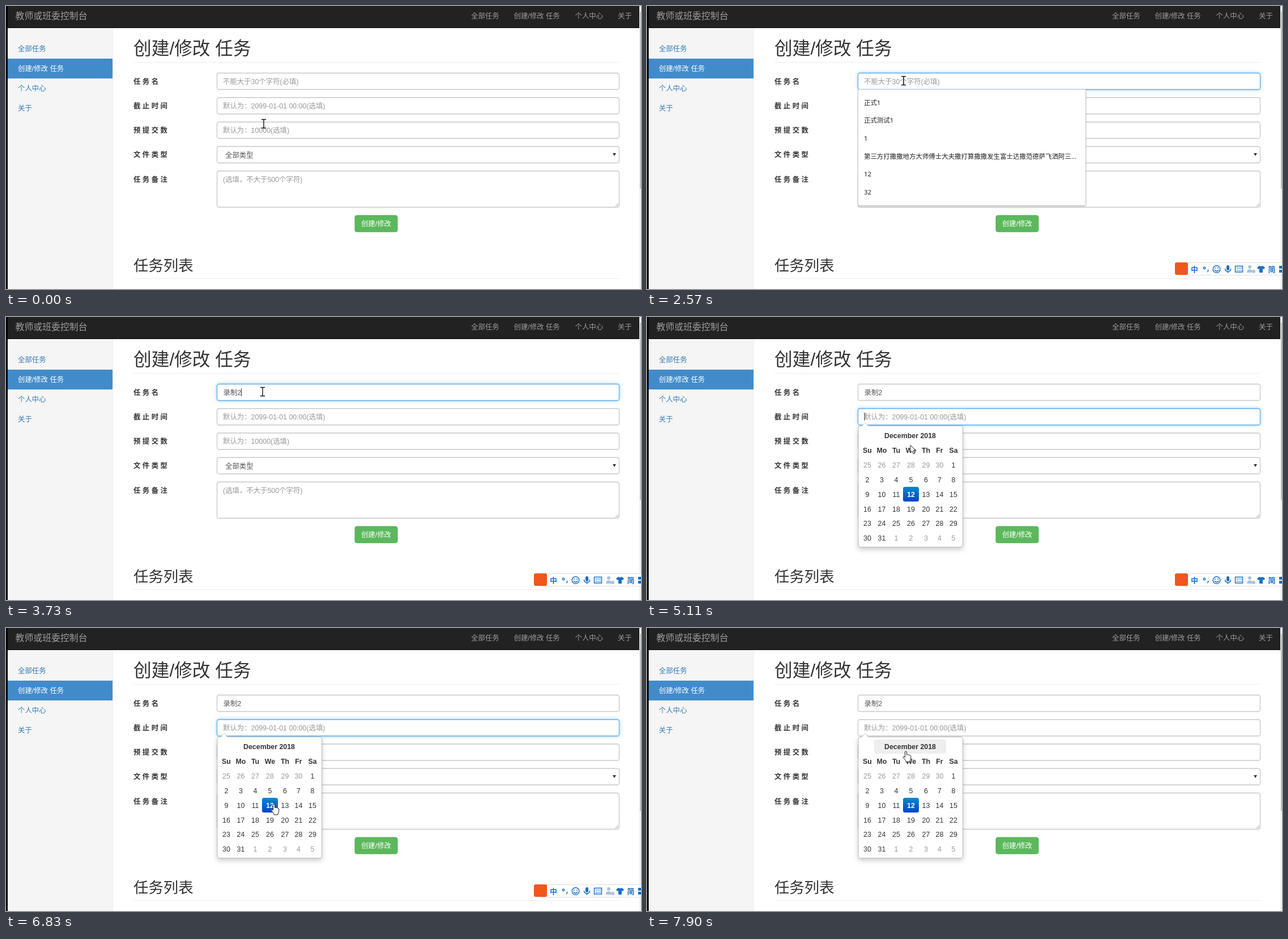
Recreate the animation shown at these times as an HTML page. Size 1121x500 px, loop 8 s.

```html
<!DOCTYPE html>
<html lang="zh-CN">
<head>
<meta charset="utf-8">
<style>
html, body { margin: 0; width: 100%; height: 100%; overflow: hidden; background: #fff; }
svg { display: block; width: 1121px; height: 500px; }
text { font-family: "Liberation Sans", "Noto Sans CJK SC", "Noto Sans CJK", sans-serif; }
.ui { font-family: "Noto Sans", "Noto Sans CJK SC", "Noto Sans CJK", sans-serif; }
.glow { filter: drop-shadow(0 0 3px rgba(102, 175, 233, .6)); }
.pop { filter: drop-shadow(0 4px 4px rgba(0, 0, 0, .2)); }
.list { filter: drop-shadow(0 1px 1px rgba(0, 0, 0, .25)); }
</style>
</head>
<body>
<svg viewBox="0 0 1121 500">
  <defs>
    <linearGradient id="active" x2="0" y2="1">
      <stop stop-color="#08c"/><stop offset="1" stop-color="#04c"/>
    </linearGradient>
  </defs>
  <g id="page"></g>
  <g id="live"></g>
</svg>
<script>
const LOOP = 8000;
const $ = id => document.getElementById(id);

// Text is placed by its left edge (or anchor) and its vertical centre.
const text = (x, cy, str, { size = 12.4, fill = '#333', more = '' } = {}) =>
  `<text x="${x}" y="${cy + size * .365}" font-size="${size}" fill="${fill}" ${more}>${str}</text>`;
const mid = 'text-anchor="middle"';
const bold = 'font-weight="700"';
const rect = (x, y, x2, y2, fill, more = '') =>
  `<rect x="${x}" y="${y}" width="${x2 - x}" height="${y2 - y}" fill="${fill}" ${more}/>`;
const path = (d, more) => `<path d="${d}" ${more}/>`;
const at = (steps, t) => steps.filter(s => s[0] <= t).pop();

function page() {
  const nav = [[821, '全部任务'], [896.5, '创建/修改 任务'], [1004.5, '个人中心'], [1080, '关于']];
  const side = ['全部任务', '创建/修改 任务', '个人中心', '关于'];
  const labels = ['任 务 名', '截 止 时 间', '预 提 交 数', '文 件 类 型', '任 务 备 注'];
  return rect(3, 39, 188, 500, '#f5f5f5') + rect(188, 39, 189, 500, '#eee')
    + rect(3, 0, 1118, 39, '#222') + rect(3, 38, 1118, 39, '#080808')
    + rect(0, 0, 3, 500, '#000')
    + rect(1118, 0, 1121, 500, '#f1f1f1') + rect(1119, 10, 1121, 323, '#c1c1c1')
    + text(16.5, 17, '教师或班委控制台', { size: 15.9, fill: '#9d9d9d' })
    + nav.map(([x, s]) => text(x, 17, s, { fill: '#9d9d9d' })).join('')
    + rect(3, 93, 188, 128, '#428bca')
    + side.map((s, i) => text(21, 75 + 35.3 * i, s, { fill: i == 1 ? '#fff' : '#337ab7' })).join('')
    + text(225, 74, '创建/修改 任务', { size: 31.7, more: 'font-weight="300"' })
    + rect(225, 99, 1083, 100, '#eee')
    + text(225, 458, '任务列表', { size: 26.4, more: 'font-weight="300"' })
    + rect(225, 481, 1083, 482, '#eee')
    + labels.map((s, i) => text(225, 133 + 43.25 * i, s, { more: bold })).join('')
    + rect(616, 370, 691, 399, '#5cb85c', 'rx="3.5" stroke="#4cae4c"')
    + text(653.5, 384.5, '创建/修改', { fill: '#fff', more: mid });
}

function box(i, focused, bottom) {
  const y = 118.5 + 43.25 * i;
  const look = focused ? 'stroke="#66afe9" class="glow"' : 'stroke="#c8c8c8"';
  return rect(372.5, y, 1082.5, bottom || y + 29, '#fff', `rx="3.5" stroke-width="1.3" ${look}`);
}

const caret = (x, y) => rect(x, y, x + 1, y + 14, '#333');

const NAME = [[0, ''], [2700, 'l'], [2830, 'lu'], [3080, "lu'z"], [3210, "lu'zhi"], [3340, '录制'], [3730, '录制2']];
const CARET = [[0, 0], [1260, 1], [1510, 0], [1990, 1], [2570, 0], [2700, 1],
  [4640, 0], [5110, 1], [5760, 0], [6280, 1], [6830, 0]];

function textWidth(str) {
  return [...str].reduce((w, c) => w + 12.4 * (c > '一' ? 1 : c == "'" ? .19 : c == 'l' || c == 'i' ? .222 : .54), 0);
}

function form(t) {
  const first = t >= 1260 && t < 4260, second = t >= 4260 && t < 6970;
  const name = at(NAME, t)[1], grey = { fill: '#999' }, ink = { fill: '#555' };
  const w = textWidth(name), composing = t >= 2700 && t < 3340;
  let s = box(0, first) + box(1, second) + box(2) + box(3) + box(4, false, 355.5);
  s += name ? text(383.5, 133, name, ink) : text(383, 133, '不能大于30个字符(必填)', grey);
  if (composing) s += rect(383.5, 139, 383.5 + w, 140, '#555');
  s += text(383, 176, '默认为：2099-01-01 00:00(选填)', grey)
    + text(383, 219.5, '默认为：10000(选填)', grey)
    + text(387, 263, '全部类型', ink)
    + text(383, 306, '(选填，不大于500个字符)', grey)
    + path('M1071 260h6l-3 5z', 'fill="#333"')
    + path('M1076 354l5-5M1079 354l2-2', 'stroke="#999"');
  if (at(CARET, t)[1]) {
    if (first) s += caret(383.5 + w, 126);
    if (second) s += caret(383.5, 169);
  }
  return s;
}

function suggestions(items, right, bottom) {
  return rect(372.5, 147.5, right, bottom, '#fff', 'rx="2" stroke="#ccc" class="list"')
    + items.map((s, i) => text(383, 170.5 + 31.7 * i, s, { size: 11.45, fill: '#222', more: 'class="ui"' })).join('');
}

function candidates(t) {
  const words = t < 3080 ? ['路', '录', '陆', '鹿', '露'] : ['录制', '录制视频', '路之', '录制软件', '鹿指'];
  const list = words.map((s, i) => `${i + 1}.${s}`).join('&#160;&#160;&#160;');
  return rect(383.5, 148.5, t < 3080 ? 600 : 714.5, 187.5, '#fff', 'stroke="#b5cbe0"')
    + text(390, 158, at(NAME, t)[1], { size: 11.5, more: 'class="ui"' })
    + text(390, 177, list, { size: 12.4, fill: '#1a6fc4', more: 'class="ui"' });
}

const popup = (right, bottom) =>
  `<g class="pop">${rect(373, 192.5, right, bottom, '#fff', 'rx="3.5" stroke="#bbb"')}</g>`
  + path('M379 193l6-6 6 6z', 'fill="#fff"') + path('M379 192.5l6-6 6 6', 'fill="none" stroke="#ccc"');
const cell = (x, y, x2, y2, fill = '#eee') => rect(x, y, x2, y2, fill, 'rx="3.5"');

const COLS = [389, 414.5, 440, 466, 492.5, 516.5, 541];
const EDGES = [376, 402, 427.5, 452, 480, 504.5, 529, 554];
const ROW = 25.9;

function calendar(hover) {
  let s = popup(557.5, 406.5);
  if (hover == 'title') s += cell(401, 197, 528, 222);
  s += text(464.5, 209.5, 'December 2018', { more: mid + bold });
  'Su Mo Tu We Th Fr Sa'.split(' ').forEach((d, i) => s += text(COLS[i], 235.5, d, { more: mid + bold }));
  for (let i = 0; i < 42; i++) {
    const c = i % 7, r = Math.floor(i / 7), n = i - 5, y = 261.3 + ROW * r;
    const other = n < 1 || n > 31, today = n == 12;
    if (today || n === hover) s += cell(EDGES[c], y - 13, EDGES[c + 1], y + 13, today ? 'url(#active)' : '#eee');
    s += text(COLS[c], y, n < 1 ? n + 30 : n > 31 ? n - 31 : n,
      { fill: today ? '#fff' : other ? '#999' : '#333', more: mid + (today ? bold : '') });
  }
  return s;
}

function hours(hover) {
  let s = popup(544, 390.5);
  if (hover == 'title') s += cell(394, 197, 522, 222);
  s += text(458, 209.5, '12 December 2018', { more: mid + bold });
  for (let h = 0; h < 24; h++) {
    const x = 400 + 38.7 * (h % 4), y = 239.3 + 26 * Math.floor(h / 4), now = h == 21;
    if (now || h === hover) s += cell(x - 17.7, y - 11.5, x + 17.7, y + 11.5, now ? 'url(#active)' : '#eee');
    s += text(x, y, h + ':00', { fill: now ? '#fff' : '#333', more: mid + (now ? bold : '') });
  }
  return s;
}

function inputBar() {
  const blue = '#1a6fc4', line = `fill="none" stroke="${blue}" stroke-width="1.5"`;
  const word = (x, s) => text(x, 465, s, { size: 13, fill: blue, more: mid + bold });
  return rect(944, 453.5, 1124, 475.5, '#fff', 'rx="3" stroke="#ddd"')
    + rect(932, 453, 955, 475, '#f0561d', 'rx="3"')
    + word(966.5, '中') + word(1103, '简')
    + `<circle cx="984" cy="463" r="1.7" ${line}/>` + path('M990 466q2 2-1 4', line)
    + `<circle cx="1005.5" cy="465" r="6.3" ${line}/>`
    + path('M1002 466q3.5 5 7 0M1003 462v2M1008 462v2', line)
    + rect(1023, 458, 1028, 467, blue, 'rx="2.5"') + path('M1020.5 464q0 5 5 5t5-5M1025.5 469v3', line)
    + rect(1038.5, 459.5, 1051.5, 470, 'none', line) + path('M1041 463h9M1041 467h9', line + ' stroke-dasharray="2 1.3"')
    + '<g fill="#a9c3de"><circle cx="1064" cy="461" r="3"/><path d="M1059 471q0-6 5-6t5 6z"/><circle cx="1071" cy="469" r="3"/></g>'
    + path('M1077 462l4-3q3 2 6 0l4 3-2 3-2-1v7h-6v-7l-2 1z', `fill="${blue}"`)
    + [459, 466].map(y => rect(1116, y, 1121, y + 5, blue)).join('');
}

const SHAPES = {
  beam: path('M-4-7.5H4M0-7.5V7.5M-4 7.5H4', 'fill="none" stroke="#111" stroke-width="1.4"'),
  arrow: path('M.5.5V13.5L3.5 10.8 6 16 8.2 15 6 10H10z', 'fill="#fff" stroke="#222"'),
  hand: path('M-1.5 10V1.5Q0-.5 1.5 1.5V7Q3 5.5 4.2 7.3 6 6 6.8 8 8.5 7.5 8.8 9.5V13Q8.5 16 7 17.5V19.5H0V17.5L-5 11.5Q-5-1-3 9.3z'
    .replace('Q-5-1-3 9.3', 'Q-5 8.5-1.5 11.5'), 'fill="#fff" stroke="#222"')
};

// time, shape, x, y, hovered part
const POINTER = [
  [0, 'beam', 455, 208], [70, 'beam', 455, 195], [190, 'beam', 454, 164], [310, 'beam', 453, 140],
  [430, 'beam', 453, 132],
  [4870, 'beam', 456, 160], [4980, 'arrow', 461, 198], [5110, 'arrow', 464.5, 226],
  [5240, 'arrow', 467, 243], [5370, 'hand', 471, 262, -2], [5490, 'hand', 478, 278, 5],
  [5620, 'hand', 490, 288, 6], [5760, 'hand', 503, 290, 6], [5890, 'hand', 513, 291, 7],
  [6010, 'hand', 497, 291, 6], [6140, 'hand', 487, 291.5, 6], [6280, 'hand', 486, 299.5, 6],
  [6420, 'hand', 475, 309, 12], [6570, 'hand', 473, 310.5, 12],
  [6970, 'hand', 464, 268, 6], [7140, 'hand', 457, 213.5, 'title'], [7290, 'hand', 457, 212, 'title'],
  [7900, 'hand', 457, 217, 'title']
];

const OLD_NAMES = ['正式1', '正式测试1', '1',
  '第三方打撒撒地方大师傅士大夫撒打算撒撒发生富士达撒范德萨飞洒阿三…', '12', '32'];

function scene(t) {
  const [, shape, x, y, hover] = at(POINTER, t);
  let s = form(t);
  if (t >= 1260 && t < 2700) s += suggestions(OLD_NAMES, 774.5, 352.5);
  if (t >= 2700 && t < 3340) s += candidates(t);
  if (t >= 3480 && t < 3730) s += suggestions(['录制1'], 439, 195);
  if (t >= 4260) s += t >= 6970 && t < 7630 ? hours(hover) : calendar(hover);
  if (t >= 1040 && t < 6970) s += inputBar();
  return s + `<g transform="translate(${x} ${y})">${SHAPES[shape]}</g>`;
}

$('page').innerHTML = page();
const start = performance.now();
let shown = '';
function draw() {
  const next = scene(Math.max(0, performance.now() - start) % LOOP);
  if (next != shown) $('live').innerHTML = shown = next;
  requestAnimationFrame(draw);
}
draw();
</script>
</body>
</html>
```
